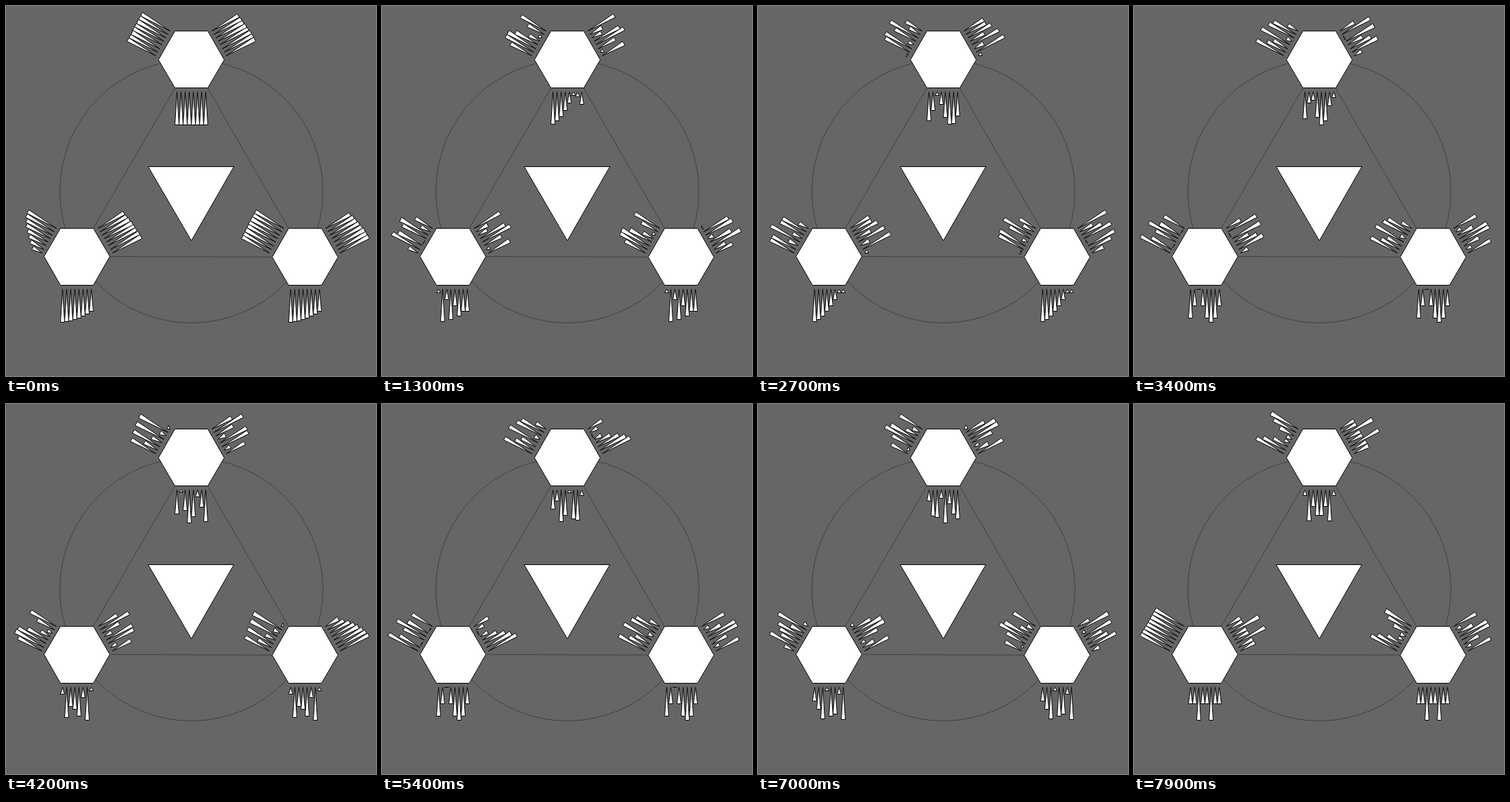
An HTML page for the animation above (8000 ms loop, 540 px wide and 540 px high).

```html
<!DOCTYPE html>
<html lang="en">
<head>
<meta charset="utf-8">
<title>Spike waves</title>
<style>
  html, body { margin: 0; width: 100%; height: 100%; overflow: hidden; background: #666; }
  svg { display: block; width: 100vw; height: 100vh; }
  .guide { fill: none; stroke: #404040; }
  .solid { fill: #fff; stroke: #000; stroke-miterlimit: 10; }
</style>
</head>
<body>
<svg id="stage" viewBox="0 0 540 540"></svg>
<script>
const stage = document.getElementById('stage');
const MID = 270, ORBIT = 192, HEX = 48, GAP = 6, SPIKES = 8;
const WIDTH = HEX / SPIKES;
const STEP_MS = 100, STEPS = 80;
const rad = deg => deg * Math.PI / 180;

function add(tag, attrs) {
  const el = document.createElementNS('http://www.w3.org/2000/svg', tag);
  for (const key in attrs) el.setAttribute(key, attrs[key]);
  return stage.appendChild(el);
}

const polar = ([x, y], r, deg) => [x + r * Math.cos(rad(deg)), y + r * Math.sin(rad(deg))];

// Vertices sit on whole pixels, so edges stay crisp.
const snap = v => Math.floor(v + 1e-6) + 0.5;
const toPoints = pts => pts.map(p => p.map(snap).join()).join(' ');
const regular = (center, r, n, start) =>
  toPoints(Array.from({ length: n }, (_, i) => polar(center, r, start + i * 360 / n)));

const centers = [0, 1, 2].map(k => polar([MID, MID], ORBIT, 120 * k - 90));
centers[2][1] -= 0.01; // lands one pixel row higher than its neighbour

add('circle', { class: 'guide', cx: MID + 0.5, cy: MID + 0.5, r: ORBIT });
add('polygon', { class: 'guide', points: toPoints(centers) });
add('polygon', { class: 'solid', points: regular([MID, MID], 72, 3, 90) });

const spikes = [];
centers.forEach((center, k) => {
  add('polygon', { class: 'solid', points: regular(center, HEX, 6, 0) });
  for (let side = 0; side < 3; side++) {
    const angle = 90 + 120 * (k + side);
    const edge = polar(center, HEX * Math.cos(rad(30)) + GAP, angle);
    for (let i = 0; i < SPIKES; i++) {
      const tip = polar(edge, (i + 0.5) * WIDTH - HEX / 2, angle - 90);
      const speed = (k + 1) * (side + 1) * (i + 1);
      spikes.push({ el: add('polygon', { class: 'solid' }), tip, angle, speed });
    }
  }
});

function draw(ms) {
  const degrees = Math.floor(ms / STEP_MS) % STEPS + 1;
  for (const { el, tip, angle, speed } of spikes) {
    const base = polar(tip, HEX * Math.abs(Math.cos(rad(degrees * speed))), angle);
    const left = polar(base, -WIDTH / 2, angle - 90);
    const right = polar(base, WIDTH / 2, angle - 90);
    el.setAttribute('points', toPoints([tip, left, right]));
  }
}

const start = performance.now();
function tick() {
  draw(performance.now() - start);
  requestAnimationFrame(tick);
}
tick();
</script>
</body>
</html>
```
